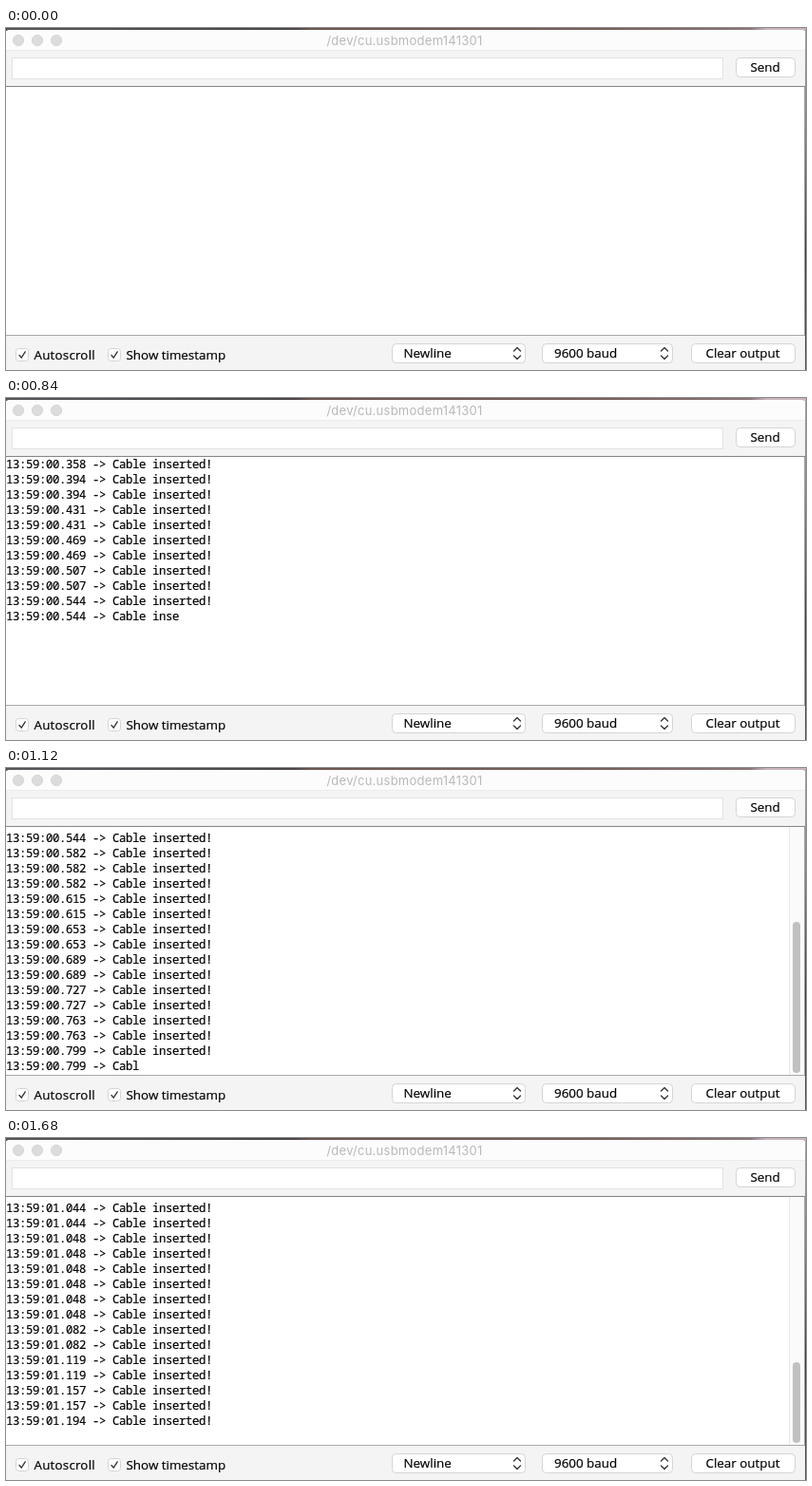
These frames come from a looping animation (842x360 px, 1.82 s). An HTML page:

```html
<!DOCTYPE html>
<html lang="en">
<head>
<meta charset="utf-8">
<title>Serial monitor</title>
<style>
html, body { margin: 0; width: 842px; height: 360px; overflow: hidden; background: #fff; }
svg { position: absolute; left: 0; top: 0; }
.ui { font: 13.4px "Open Sans", "Noto Sans", sans-serif; fill: #000; stroke: #000; stroke-width: .2px; }
.title { font: 13px Inter, sans-serif; fill: #b9b9b9; letter-spacing: .26px; }
.button { fill: #fff; stroke: #d4d4d4; }
.mark { fill: none; stroke: #333; stroke-width: 1.3; stroke-linecap: round; stroke-linejoin: round; }
#view { position: absolute; left: 0; top: 62px; width: 840px; height: 261px; overflow: hidden; background: #fff; }
#log {
  position: absolute; left: 0; margin: 0; white-space: pre; color: #000;
  font: 12.3px/16px "Noto Sans Mono", "DejaVu Sans Mono", monospace;
  letter-spacing: -.38px; -webkit-text-stroke: .2px #000;
}
#track { position: absolute; left: 824px; top: 0; width: 15px; height: 261px; border-left: 1px solid #e8e8e8; background: #fafafa; }
#thumb { position: absolute; left: 3px; width: 8px; border-radius: 4px; background: #c1c1c1; }
</style>
</head>
<body>
<svg width="842" height="360" viewBox="0 0 842 360">
  <defs>
    <linearGradient id="desk">
      <stop offset="0" stop-color="#55555a"/>
      <stop offset=".36" stop-color="#4a4648"/>
      <stop offset=".38" stop-color="#6d5550"/>
      <stop offset=".75" stop-color="#77605c"/>
      <stop offset=".93" stop-color="#8c7578"/>
      <stop offset=".95" stop-color="#c9b4bc"/>
    </linearGradient>
    <linearGradient id="edge" x2="0" y2="1">
      <stop offset="0" stop-color="#b5a5ab"/>
      <stop offset=".3" stop-color="#8a8388"/>
      <stop offset=".65" stop-color="#3c3c42"/>
      <stop offset="1" stop-color="#55555a"/>
    </linearGradient>
    <path id="arrows" class="mark" d="M-3.5 -2.5L0 -6L3.5 -2.5M-3.5 2.5L0 6L3.5 2.5"/>
    <g id="check">
      <rect class="button" x=".5" y=".5" width="13" height="13" rx="3"/>
      <path class="mark" d="M4 7.5L6.2 10.2L10.2 3.8"/>
    </g>
  </defs>
  <rect width="842" height="3" fill="url(#desk)"/>
  <rect x="841" y="2" width="1" height="358" fill="url(#edge)"/>
  <path d="M0 360V6Q0 2 4 2H837Q841 2 841 6V360Z" fill="#f4f4f4"/>
  <path d="M0 24V6Q0 2 4 2H837Q841 2 841 6V24Z" fill="#fcfcfc"/>
  <path d="M0 23.5H841" stroke="#ececec"/>
  <g fill="#dcdcdc" stroke="#d6d6d6">
    <circle cx="13" cy="13" r="5.6"/><circle cx="33" cy="13" r="5.6"/><circle cx="53" cy="13" r="5.6"/>
  </g>
  <text class="title" x="419.5" y="18" text-anchor="middle">/dev/cu.usbmodem141301</text>

  <rect x="6.5" y="31.5" width="748" height="22" fill="#fff" stroke="#e2e2e2"/>
  <g class="button">
    <rect x="768.5" y="31.5" width="62" height="20" rx="4"/>
    <rect x="406.5" y="332.5" width="140" height="20" rx="4"/>
    <rect x="564.5" y="332.5" width="137" height="20" rx="4"/>
    <rect x="721.5" y="332.5" width="109" height="20" rx="4"/>
  </g>
  <path d="M0 61.5H841" stroke="#858585"/>
  <path d="M0 323.5H841" stroke="#a8a8a8"/>
  <path d="M840.5 62V323" stroke="#a8a8a8"/>

  <use href="#check" x="10" y="337"/>
  <use href="#check" x="107" y="337"/>
  <use href="#arrows" x="538" y="342.5"/>
  <use href="#arrows" x="693" y="342.5"/>
  <g class="ui">
    <text x="783.5" y="46">Send</text>
    <text x="29.5" y="349" letter-spacing=".2">Autoscroll</text>
    <text x="126.5" y="349">Show timestamp</text>
    <text x="418.5" y="347">Newline</text>
    <text x="577" y="347">9600 baud</text>
    <text x="736.5" y="347">Clear output</text>
  </g>
</svg>
<div id="view">
  <pre id="log"></pre>
  <div id="track"><div id="thumb"></div></div>
</div>
<script>
const LOOP = 1820, TICK = 70, START = 700;
const ROW = 16, VIEW = 261, MSG = 'Cable inserted!';

// Packet arrivals in ms after 13:59:00; each starts two lines unless listed in bursts
const packets = [358, 394, 431, 469, 507, 544, 582, 615, 653, 689, 727,
  763, 799, 835, 869, 903, 1044, 1048, 1082, 1119, 1157, 1194];
const bursts = { 0: 1, 6: 3, 16: 3, 17: 6 };
const LAST = packets.length - 1;

const [log, track, thumb] = ['log', 'track', 'thumb'].map(id => document.getElementById(id));
let shown;

// Newest packet on screen; after the stall only one is drawn per tick
function packetAt(t) {
  const tick = Math.floor(t / TICK);
  const clock = tick * TICK - START + 409;
  return t < START ? -1 : Math.min(packets.findLastIndex(ms => ms <= clock), tick - 3);
}

// Letters of the unfinished line
function lettersAt(k) {
  if (k === LAST) return 0;
  return k < 6 ? 10 : k < 8 ? 1 : 4;
}

function line(ms, letters) {
  const clock = (ms / 1000).toFixed(3).padStart(6, '0');
  return letters ? `13:59:${clock} -> ${MSG.slice(0, letters)}` : '';
}

function draw(k) {
  const stamps = packets.slice(0, k + 1).flatMap((ms, i) => Array(bursts[i] ?? 2).fill(ms));
  const rows = stamps.length;
  log.textContent = stamps
    .map((ms, i) => line(ms, i < rows - 1 ? MSG.length : lettersAt(k)))
    .join('\n');

  const scrolled = rows > 16;
  log.style.top = (scrolled ? VIEW - rows * ROW : 1) - 1 + 'px';
  track.style.display = scrolled ? 'block' : 'none';
  const size = 256 * VIEW / (rows * ROW + 2);
  const lag = rows <= 20 ? 26 : 0; // the bar trails when it first appears
  thumb.style.height = size + 'px';
  thumb.style.top = 259.5 - size - lag + 'px';
}

function frame() {
  const k = packetAt(performance.now() % LOOP);
  if (k !== shown) draw(shown = k);
  requestAnimationFrame(frame);
}
frame();
</script>
</body>
</html>
```
